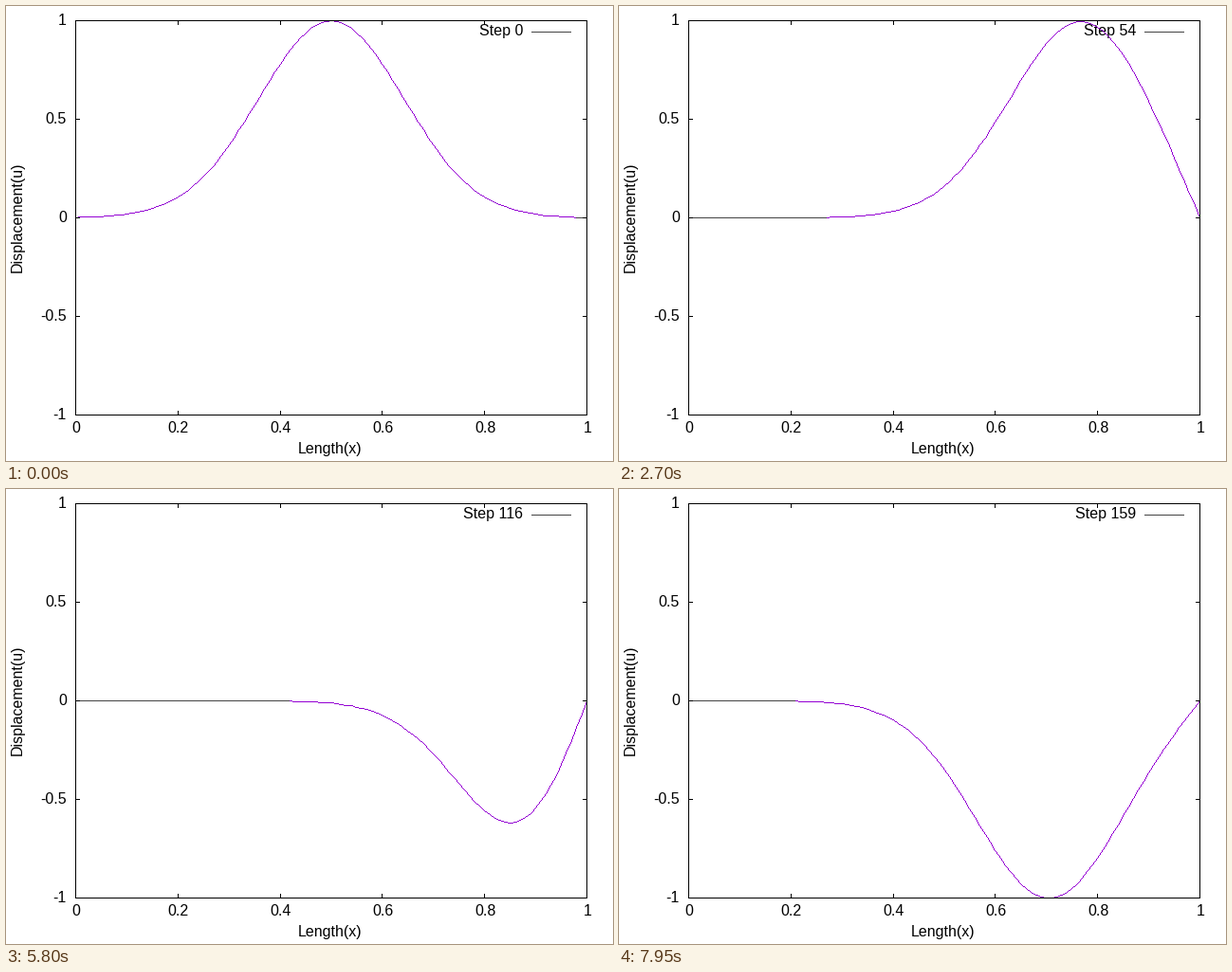
A matplotlib script that plays this animation: 640x480 px, repeating every 8000 ms.

```python
import numpy as np
import matplotlib.pyplot as plt
from matplotlib.animation import FuncAnimation

W, H, DPI = 640, 480, 80
LEFT, RIGHT, TOP, BOTTOM = 73, 612, 15, 431
MID = (TOP + BOTTOM) // 2
STEPS, INTERVAL = 160, 50
SPEED = 0.005          # distance travelled per step
TICK = 5

PURPLE = (148, 0, 211, 255)
GRAY = (68, 68, 68, 255)
BLACK = (0, 0, 0, 255)

plt.rcParams["font.family"] = "Liberation Sans"
plt.rcParams["font.size"] = 16 * 72 / DPI

fig = plt.figure(figsize=(W / DPI, H / DPI), dpi=DPI, facecolor="white")


def col(x):
    return LEFT + x * (RIGHT - LEFT)


def row(u):
    return MID - u * (BOTTOM - TOP) / 2


def snap(v):
    return np.floor(np.asarray(v) + 0.5).astype(int)


def label(x, y, text, **kw):
    kw = {"ha": "center", "va": "baseline", "color": "black", "zorder": 1, **kw}
    return fig.text(x / W, 1 - y / H, text, **kw)


def pulse(x, center):
    return np.exp(-25 * (x - center) ** 2)


def wave(x, step):
    """Right-moving pulse minus its mirror image beyond the fixed end."""
    shift = SPEED * step
    return pulse(x, 0.5 + shift) - pulse(x, 1.5 - shift)


def draw_border(img):
    img[[TOP, BOTTOM], LEFT:RIGHT + 1] = BLACK
    img[TOP:BOTTOM + 1, [LEFT, RIGHT]] = BLACK
    for x in snap(col(np.linspace(0.2, 0.8, 4))):
        img[TOP:TOP + TICK, x] = BLACK
        img[BOTTOM - TICK + 1:BOTTOM + 1, x] = BLACK
    for y in snap(row(np.linspace(-0.5, 0.5, 3))):
        img[y, LEFT:LEFT + TICK] = BLACK
        img[y, RIGHT - TICK + 1:RIGHT + 1] = BLACK


def draw_curve(img, step):
    grid = np.linspace(0, 1, 101)
    xs, ys = snap(col(grid)), snap(row(wave(grid, step)))
    for x0, y0, x1, y1 in zip(xs, ys, xs[1:], ys[1:]):
        n = max(abs(x1 - x0), abs(y1 - y0)) + 1
        px = snap(np.linspace(x0, x1, n))
        py = snap(np.linspace(y0, y1, n))
        img[py, px] = GRAY if y0 == y1 == MID else PURPLE


def picture(step):
    img = np.zeros((H, W, 4), np.uint8)
    img[27, 554:596] = GRAY
    draw_curve(img, step)
    draw_border(img)
    return img


for i in range(6):
    label(col(i / 5) + 1, 450, f"{i / 5:g}")
for i in range(-2, 3):
    label(64, row(i / 2) + 5, f"{i / 2:g}".replace("\u2212", "-"), ha="right")
label(342, 472, "Length(x)")
label(17.5, MID, "Displacement(u)", rotation=90, ha="right", va="center",
      rotation_mode="default").set_visible(False)
label(17, MID, "Displacement(u)", rotation=90, rotation_mode="anchor")

key = label(545, 31, "Step 0", ha="right")
layer = fig.figimage(picture(0), origin="upper")
layer.set_zorder(2)


def update(step):
    key.set_text(f"Step {step}")
    layer.set_data(picture(step))
    return key, layer


anim = FuncAnimation(fig, update, frames=STEPS, interval=INTERVAL,
                     init_func=lambda: update(0), repeat=True, repeat_delay=0,
                     blit=False)
plt.show()
```
